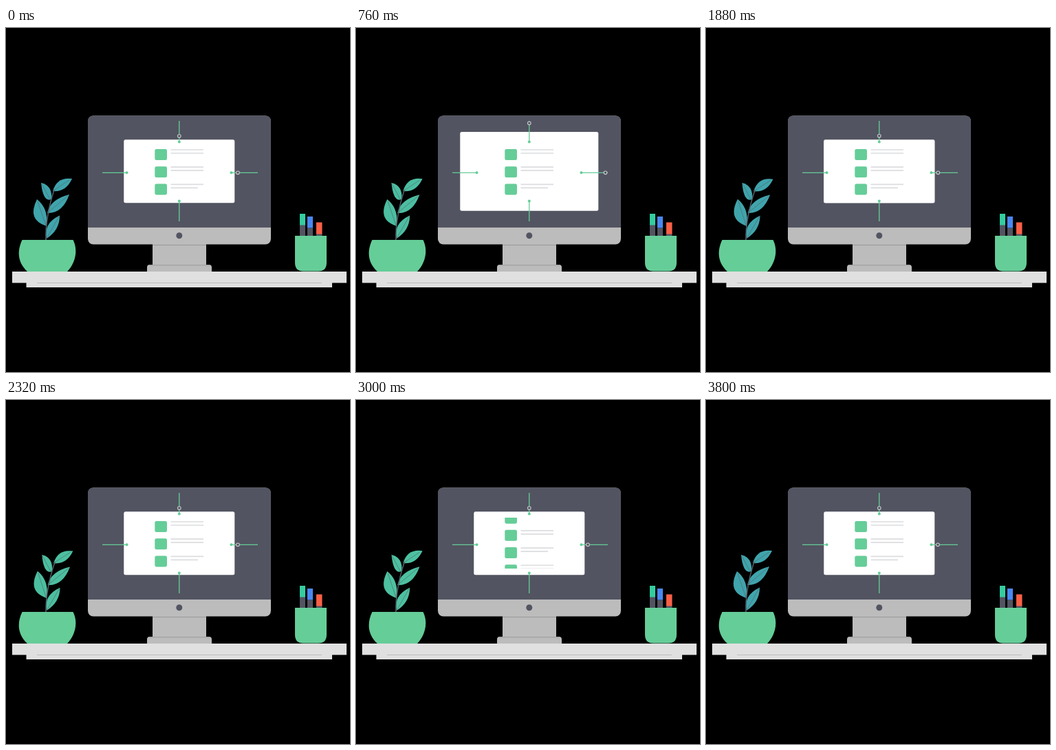
Write an HTML page that moves like this. It is 500 px wide and 500 px high and loops after 3840 ms.

```html
<!DOCTYPE html>
<html lang="en">
<head>
<meta charset="utf-8">
<title>Desk</title>
<style>
  html, body { margin: 0; width: 100%; height: 100%; overflow: hidden; background: #000; }
  svg { display: block; width: 100vw; height: 100vh; }
  .green { fill: #65cd98; }
  .dark { fill: #525461; }
  .metal { fill: #bcbcbc; }
  .desk { fill: #e0e0e0; }
  .rail { stroke: #65cd98; stroke-width: 1.3; fill: none; }
  .text { stroke: #dcdde0; stroke-width: 1.7; }
  .vein { stroke: #52616a; stroke-width: .6; fill: none; }
  .handle { fill: #525461; stroke: #c8c9cc; stroke-width: 1.1; }
</style>
</head>
<body>
<svg viewBox="0 0 500 500">
  <defs>
    <clipPath id="view"><rect x="200" y="171" width="110" height="74"/></clipPath>
  </defs>

  <!-- plant -->
  <g id="plant">
    <g id="leaves">
      <path d="M68 237Q74 216 96 219Q87 239 68 237Z"/>
      <path d="M51 225Q68 229 66 249Q54 254 51 225Z"/>
      <path d="M60 269Q64 249 92 242Q82 270 60 269Z"/>
      <path d="M45 249Q30 279 59 288Q62 262 45 249Z"/>
      <path d="M59 306Q54 284 78 272.500Q78 294 59 306Z"/>
    </g>
    <path class="vein" d="M68 237L92 221M52 227L64 249M60 269L90 244M46 252L58 287M59 306L77 274"/>
    <path d="M58 308Q57 276 70 235" fill="none" stroke="#52616a" stroke-width="1.5"/>
  </g>
  <path class="green" d="M23.500 308H97.500C106 325 99 344 89 354H31C18 342 15 326 23.500 308Z"/>

  <!-- computer -->
  <rect class="metal" x="213" y="314" width="78" height="31"/>
  <path d="M213 315.500H291" stroke="#999"/>
  <path class="metal" d="M205 354V348Q205 344 209 344H295Q299 344 299 348V354Z"/>
  <path d="M208 344.800H296" stroke="#999"/>
  <rect class="metal" x="119" y="127.500" width="266" height="187" rx="8"/>
  <path class="dark" d="M119 290V135.500Q119 127.500 127 127.500H377Q385 127.500 385 135.500V290Z"/>
  <circle class="dark" cx="251.800" cy="301.800" r="4.500"/>

  <!-- resizable window -->
  <rect id="window" fill="#fff" rx="2.500"/>
  <g clip-path="url(#view)"><g id="list"></g></g>
  <path class="rail" d="M251.800 135V165.500M251.800 251.500V281M140 210.300H175.500M327.500 210.300H366"/>
  <g class="green">
    <circle cx="251.800" cy="165.500" r="2"/>
    <circle cx="251.800" cy="251.500" r="2"/>
    <circle cx="175.500" cy="210.300" r="2"/>
    <circle cx="327.500" cy="210.300" r="2"/>
  </g>
  <circle id="top" class="handle" cx="251.800" r="2.300"/>
  <circle id="side" class="handle" cy="210.300" r="2.300"/>

  <!-- pens and cup -->
  <path class="dark" d="M427 286h8v17h-8zM438 290.500h8v13h-8zM451 299h8.500v4h-8.500z"/>
  <rect x="427" y="270" width="8" height="16.500" fill="#35cda0"/>
  <rect x="438" y="274" width="8" height="16.500" fill="#4a88f2"/>
  <rect x="451" y="282.500" width="8.500" height="17" fill="#fb6046"/>
  <path class="green" d="M420 302H466V341Q466 353.500 454 353.500H432Q420 353.500 420 341Z"/>

  <!-- desk -->
  <path class="desk" d="M9 354H495V370.500H474V377H29.500V370.500H9Z"/>
  <path d="M45 370.500H459" stroke="#bdbdbd"/>
</svg>
<script>
  const LOOP = 3840, ROW = 25.2, UNIT = LOOP / 6;
  const get = id => document.getElementById(id);
  const set = (id, attrs) => {
    for (const name in attrs) get(id).setAttribute(name, attrs[name]);
  };
  const mix = (a, b, k) => a + (b - a) * k;
  const progress = (t, from, to) => Math.min(1, Math.max(0, (t - from) / (to - from)));
  const smooth = k => k * k * (3 - 2 * k);
  const cubic = k => k < .5 ? 4 * k ** 3 : 1 - 4 * (1 - k) ** 3;

  // Six rows: the three entries repeat so the scroll can loop.
  get('list').innerHTML = Array.from({ length: 6 }, (_, i) => {
    const y = 176 + i * ROW, end = i % 3 === 2 ? 279 : 287;
    return `<rect class="green" x="216.3" y="${y}" width="17.7" height="16" rx="2.3"/>
      <path class="text" d="M239.500 ${y + 1}H287M239.500 ${y + 6}H${end}"/>`;
  }).join('');

  const BLUE = [64, 164, 172], GREEN = [82, 204, 155];

  function draw(t) {
    const size = smooth(progress(t, 0, UNIT)) - smooth(progress(t, 2 * UNIT, 3 * UNIT));
    const width = mix(161, 201, size), height = mix(92, 114.700, size);
    set('window', { x: 251.8 - width / 2, y: 208.3 - height / 2, width, height });
    set('top', { cy: mix(157, 138.300, size) });
    set('side', { cx: mix(337, 362.500, size) });

    const scroll = 3 * ROW * cubic(progress(t, 4 * UNIT, LOOP));
    set('list', { transform: `translate(0 ${-scroll})` });

    const half = Math.min(t, LOOP - t);
    const tint = smooth(progress(half, 0, 2 * UNIT)) - smooth(progress(half, 2 * UNIT, 3 * UNIT));
    set('leaves', { fill: `rgb(${BLUE.map((c, i) => mix(c, GREEN[i], tint))})` });
    const sway = smooth(half / (LOOP / 2));
    set('plant', { transform: `rotate(${sway} 58 307)` });
  }

  function frame() {
    draw(performance.now() % LOOP);
    requestAnimationFrame(frame);
  }
  frame();
</script>
</body>
</html>
```
